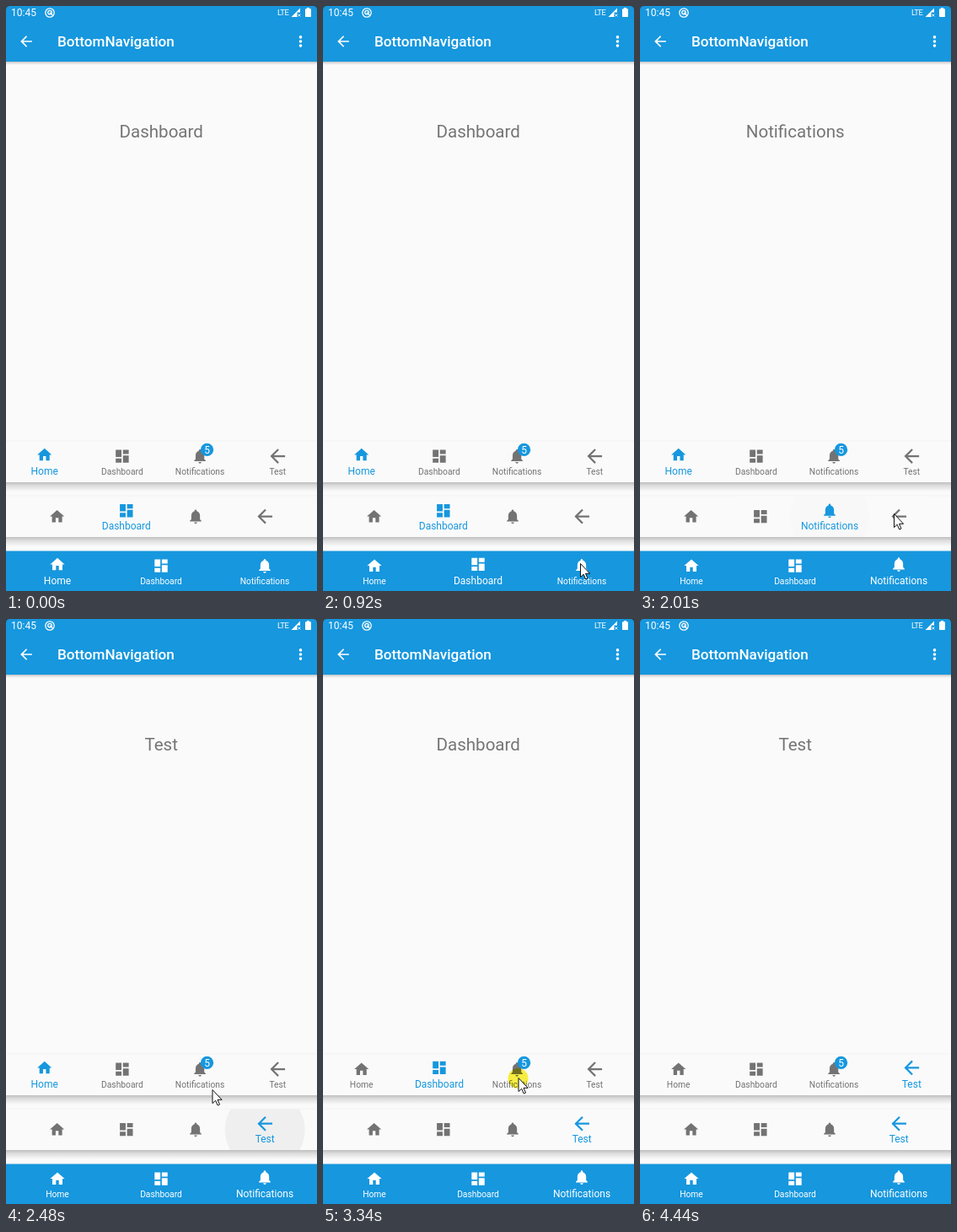
An HTML page that plays this animation: 369 px wide and 694 px high, repeating every 5080 ms.

```html
<!DOCTYPE html>
<html lang="en">
<head>
<meta charset="utf-8">
<title>Bottom navigation</title>
<style>
  html, body { margin: 0; width: 100%; height: 100%; overflow: hidden; background: #fafafa; }
  svg { display: block; width: 369px; height: 694px; font-family: Roboto, sans-serif; }
  .mid { text-anchor: middle; }
</style>
</head>
<body>
<svg id="stage" viewBox="0 0 369 694">
  <defs>
    <linearGradient id="shade" x2="0" y2="1">
      <stop offset="0" stop-color="#000" stop-opacity=".24"/>
      <stop offset=".35" stop-color="#000" stop-opacity=".12"/>
      <stop offset="1" stop-color="#000" stop-opacity="0"/>
    </linearGradient>
    <clipPath id="clip0"><rect y="516.5" width="369" height="48.5"/></clipPath>
    <clipPath id="clip1"><rect y="581.5" width="369" height="48.5"/></clipPath>
  </defs>
  <rect width="369" height="694" fill="#fafafa"/>

  <rect y="66" width="369" height="4" fill="url(#shade)"/>
  <rect width="369" height="66" fill="#1697de"/>
  <path d="M0 0H5Q0 0 0 5ZM369 0H364Q369 0 369 5Z" fill="#3a3f44"/>
  <g fill="#fff">
    <text x="6" y="12.3" font-size="12">10:45</text>
    <text x="322" y="11.4" font-size="9.5" letter-spacing="-.5">LTE</text>
    <path d="M338.5 13 349 2.5V7.5H345.5V13Z"/>
    <path d="M346.6 9.6l2.8 2.8m0-2.8l-2.8 2.8" stroke="#fff"/>
    <path d="M357 2h3v1.2h1.2q.8 0 .8.8v8.2q0 .8-.8.8h-5.4q-.8 0-.8-.8v-8.2q0-.8.8-.8h1.2z"/>
    <g fill="none" stroke="#fff" stroke-width="1.3">
      <circle cx="52" cy="8" r="5.2"/>
      <circle cx="52" cy="7.6" r="2.3"/>
      <path d="M52 7.6l3.4 3.4"/>
    </g>
    <text x="61" y="48.4" font-size="17.14" font-weight="500">BottomNavigation</text>
    <circle cx="349.5" cy="36.9" r="1.8"/>
    <circle cx="349.5" cy="42" r="1.8"/>
    <circle cx="349.5" cy="47.1" r="1.8"/>
  </g>
  <text id="title" class="mid" x="184.2" y="156.4" font-size="20.57" fill="#757575"></text>
  <g id="bars"></g>
  <circle id="press" r="12" fill="#fbf244" style="mix-blend-mode:multiply"/>
  <path id="cursor" d="M.5.5V16.6L4.2 13.2 6.7 19 9 18 6.5 12.3H11.6Z" fill="#fff" stroke="#111" stroke-linejoin="round"/>
</svg>
<script>
const LOOP = 5080, SCALE = 0.857, BLUE = '#1697de', GRAY = '#737373';
const $ = id => document.getElementById(id);

const icons = {
  Home: 'M10 20v-6h4v6h5v-8h3L12 3 2 12h3v8z',
  Dashboard: 'M3 13h8V3H3zM3 21h8v-6H3zM13 21h8V11h-8zM13 3v6h8V3z',
  Notifications: 'M12 22c1.1 0 2-.9 2-2h-4c0 1.1.89 2 2 2zm6-6v-5c0-3.07-1.64-5.64-4.5-6.32V4c0-.83-.67-1.5-1.5-1.5s-1.5.67-1.5 1.5v.68C7.63 5.36 6 7.92 6 11v5l-2 2v1h16v-1l-2-2z',
  Test: 'M20 11H7.83l5.59-5.59L12 4l-8 8 8 8 1.41-1.41L7.83 13H20z'
};
const names = Object.keys(icons);

// Screen updates come in bursts: [first, last, number of updates]
const bursts = [[230, 690, 7], [770, 1230, 7], [1320, 1780, 7], [1850, 2010, 3],
  [2160, 2640, 7], [2710, 3190, 7], [3270, 3750, 7], [3850, 4370, 8], [4440, 4440, 1]];

// Clicks: time, bar, item
const clicks = [[383, 2, 1], [1000, 2, 2], [1550, 1, 2], [2160, 1, 3],
  [2710, 0, 1], [3350, 0, 2], [3850, 0, 3]];
const SELECT_DELAY = 145, RIPPLE_DELAY = 60;

// Pointer: time, x, y
const route = [[230, 176, 680], [383, 184, 666], [537, 184, 666], [690, 233, 665],
  [923, 305, 661], [1320, 305, 661], [1550, 222, 602], [1780, 222, 602],
  [2010, 301, 602], [2320, 301, 602], [2480, 244.5, 558], [2640, 146, 546],
  [2710, 138, 545], [2950, 138, 545], [3190, 231.5, 544], [3590, 231.5, 544],
  [3750, 291.5, 540], [3850, 313, 540], [4150, 313, 540], [4370, 313, 644]];

const bars = [
  { top: 517, x0: 45.7, step: 92.2, count: 4, start: 0, reach: 51.5 },
  { top: 582, x0: 60.6, step: 82.2, count: 4, start: 1, reach: 47.5, iconOnly: true },
  { top: 647, x0: 61, step: 123, count: 3, start: 0, solid: true }
];

const clamp = v => Math.max(0, Math.min(1, v));
const mix = (a, b, p) => a + (b - a) * p;

function add(parent, tag, attrs) {
  const node = document.createElementNS('http://www.w3.org/2000/svg', tag);
  set(node, attrs);
  parent.appendChild(node);
  return node;
}
function set(node, attrs) {
  for (const k in attrs) node.setAttribute(k, attrs[k]);
}
function placeIcon(node, x, y, scale) {
  node.setAttribute('transform', `translate(${x} ${y}) scale(${scale}) translate(-12 -12)`);
}

function buildBar(bar, index) {
  const g = add($('bars'), 'g', {});
  if (bar.solid) {
    add(g, 'rect', { y: 646.5, width: 369, height: 48, fill: BLUE });
  } else {
    const y = bar.top - 0.5;
    add(g, 'rect', { y: y - 1, width: 369, height: 1, fill: '#f3f3f3' });
    add(g, 'rect', { y: y + 48.5, width: 369, height: 11, fill: 'url(#shade)' });
    add(g, 'rect', { y, width: 369, height: 48.5, fill: '#fafafa' });
    const clip = add(g, 'g', { 'clip-path': `url(#clip${index})` });
    bar.ripple = add(clip, 'circle', { fill: '#000' });
  }
  bar.items = names.slice(0, bar.count).map((name, i) => {
    const item = { name, x: bar.x0 + bar.step * i };
    item.icon = add(g, 'path', { d: icons[name] });
    item.label = add(g, 'text', { class: 'mid', x: item.x, y: bar.top + 39.2 });
    item.label.textContent = name;
    return item;
  });
  if (index === 0) {
    add(g, 'circle', { cx: 238.5, cy: 526.4, r: 7.7, fill: BLUE });
    add(g, 'text', { class: 'mid', x: 238.5, y: 530.7, 'font-size': 12, fill: '#fff' }).textContent = '5';
  }
}

function snap(t) {
  let shown = 0;
  for (const [first, last, n] of bursts) {
    if (t < first) break;
    const step = n > 1 ? (last - first) / (n - 1) : 1;
    shown = first + step * Math.min(n - 1, Math.floor((t - first + 12) / step));
  }
  return shown;
}

function pointerAt(t) {
  const i = route.findIndex(k => k[0] > t);
  if (i < 0) return route[route.length - 1].slice(1);
  if (i === 0) return route[0].slice(1);
  const a = route[i - 1], b = route[i], p = (t - a[0]) / (b[0] - a[0]);
  return [mix(a[1], b[1], p), mix(a[2], b[2], p)];
}

function drawBar(bar, index, t) {
  let now = bar.start, before = -1, p = 1;
  const own = clicks.filter(c => c[1] === index);
  for (const [time, , item] of own) {
    const age = t - time - SELECT_DELAY;
    if (age < 0) break;
    before = now;
    now = item;
    p = clamp((age + 45) / 115);
  }
  bar.items.forEach((item, i) => {
    const on = i === now ? p : i === before ? 1 - p : 0;
    const fill = bar.solid ? '#fff' : i === now ? BLUE : GRAY;
    const rest = bar.iconOnly ? 23.6 : 17.1, raised = bar.iconOnly ? 16.7 : 15.4;
    placeIcon(item.icon, item.x, bar.top + mix(rest, raised, on), item.name === 'Test' ? 1.1 : SCALE);
    set(item.icon, { fill });
    set(item.label, {
      fill,
      'font-size': mix(10.29, 12, on),
      opacity: bar.iconOnly ? on : 1
    });
  });

  if (!bar.ripple) return;
  bar.ripple.setAttribute('opacity', 0);
  for (const [time, , item] of own) {
    const age = t - time - RIPPLE_DELAY;
    if (age < 0 || age > 415) continue;
    const [px, py] = pointerAt(time), grow = clamp((age - 17) / 150);
    set(bar.ripple, {
      cx: mix(px, bar.items[item].x, grow),
      cy: mix(py + 1.5, bar.top + 24, grow),
      r: mix(25, bar.reach, grow),
      opacity: mix(0.03, 0.042, grow) * clamp((415 - age) / 70)
    });
  }
}

function draw(time) {
  const t = snap(time);
  bars.forEach((bar, i) => drawBar(bar, i, t));

  // The first click repeats the page already shown
  let page = 1;
  for (const [at, , item] of clicks) if (t >= at + SELECT_DELAY) page = item;
  $('title').textContent = names[page];

  const [x, y] = pointerAt(t);
  set($('cursor'), {
    transform: `translate(${x} ${y})`,
    visibility: t >= 230 && t < 4440 ? 'visible' : 'hidden'
  });
  const pressed = clicks.some(c => t >= c[0] - 15 && t < c[0] + RIPPLE_DELAY);
  set($('press'), { cx: x, cy: y + 1, visibility: pressed ? 'visible' : 'hidden' });
}

bars.forEach(buildBar);
add($('stage'), 'path', { id: 'back', d: icons.Test, fill: '#fff' });
placeIcon($('back'), 24, 42, SCALE);

const begin = performance.now();
function tick() {
  draw((performance.now() - begin) % LOOP);
  requestAnimationFrame(tick);
}
tick();
</script>
</body>
</html>
```
